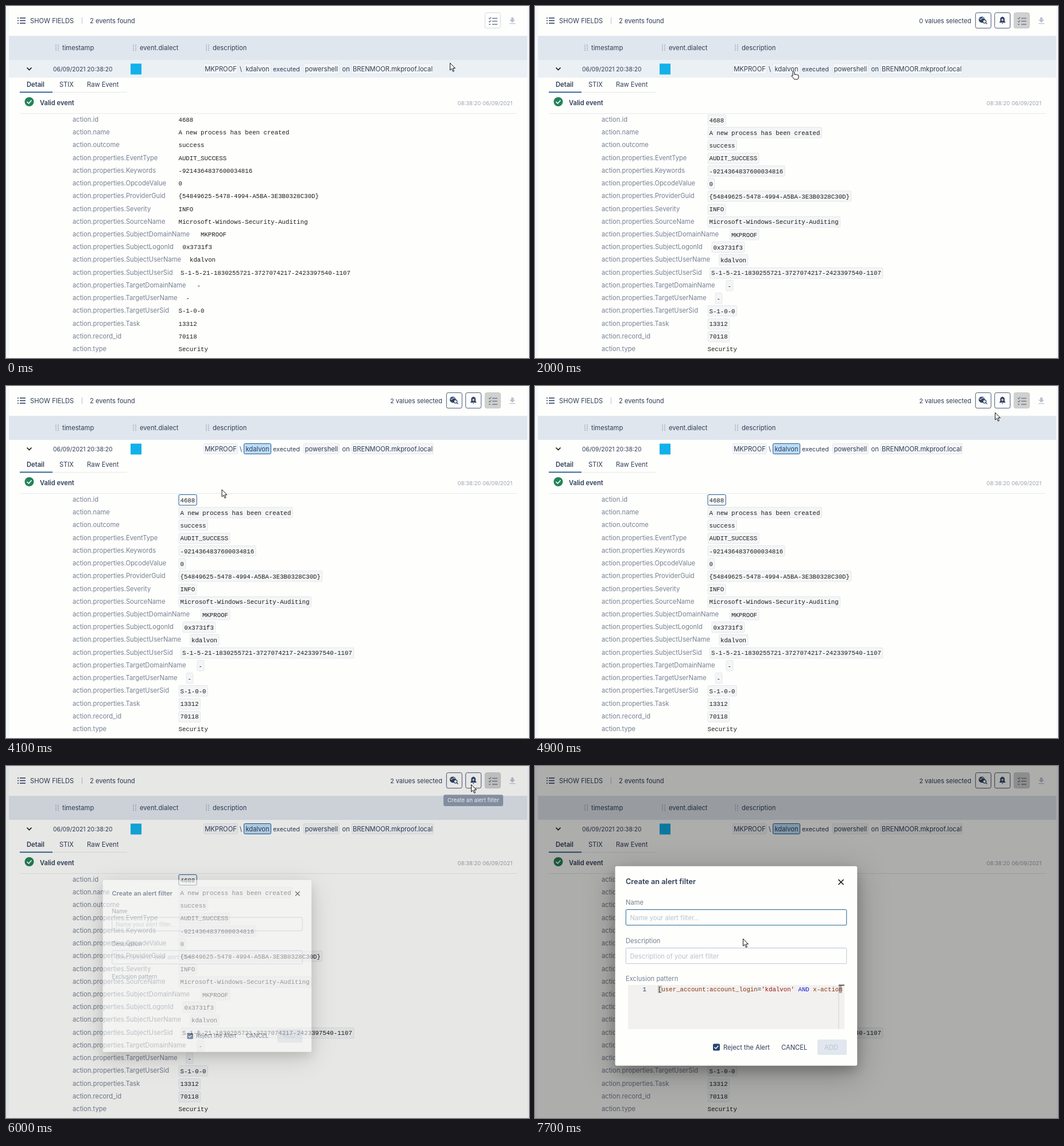
An HTML page that plays this animation: 911 px wide and 614 px high, repeating every 8 s.

```html
<!DOCTYPE html>
<html lang="en">
<head>
<meta charset="utf-8">
<title>Alert filter from an event</title>
<style>
  html, body { margin: 0; width: 100%; height: 100%; overflow: hidden; background: #f5f8fc; }
  svg { display: block; width: 911px; height: 614px; }
  text { font: 11.2px Inter, sans-serif; fill: #2f3e59; white-space: pre; }
  .bold { font-weight: 600; }
  .label { fill: #758093; }
  .hint { fill: #b9c2d0; }
  .mono { font: 10.72px "Liberation Mono", monospace; fill: #1c1c1c; }
  .date { font-size: 10.3px; }
  .small { font-size: 9.5px; fill: #9ca4b0; }
  .tip { font-size: 9.6px; fill: #fff; }
  .chip { fill: #f4f5f6; stroke: #e4e8ed; }
  .chip.picked { fill: #bcdcf6; stroke: #1d5a92; }
  .chip.outlined { fill: #fefefc; stroke: #1d5a92; }
  .button { fill: #fefefc; stroke: #46567a; }
  .field { fill: #fefefc; stroke: #b9c5d8; }
  .field.focused { stroke: #1f6596; }
  #panel { filter: drop-shadow(0 9px 10px #0003) drop-shadow(0 12px 26px #0004); }
</style>
</head>
<body>
<svg id="stage" viewBox="0 0 911 614"></svg>
<script>
const USER = 'kdalvon', DOMAIN = 'MKPROOF', HOST = 'BRENMOOR.mkproof.local';
const LOOP = 8000, STEP = 100, ROW = 22.22, CHAR = 6.433;

// label, value, optional value position
const fields = [
  ['id', '4688'],
  ['name', 'A new process has been created'],
  ['outcome', 'success'],
  ['properties.EventType', 'AUDIT_SUCCESS'],
  ['properties.Keywords', '-9214364837600034816'],
  ['properties.OpcodeValue', '0'],
  ['properties.ProviderGuid', '{54849625-5478-4994-A5BA-3E3B0328C30D}'],
  ['properties.Severity', 'INFO'],
  ['properties.SourceName', 'Microsoft-Windows-Security-Auditing'],
  ['properties.SubjectDomainName', DOMAIN, 339],
  ['properties.SubjectLogonId', '0x3731f3', 307.5],
  ['properties.SubjectUserName', USER, 320],
  ['properties.SubjectUserSid', 'S-1-5-21-1830255721-3727074217-2423397540-1107', 304],
  ['properties.TargetDomainName', '-', 332.5],
  ['properties.TargetUserName', '-', 313.5],
  ['properties.TargetUserSid', 'S-1-0-0'],
  ['properties.Task', '13312'],
  ['record_id', '70118'],
  ['type', 'Security'],
];

const text = (x, y, content, cls = '', extra = '') =>
  `<text x="${x}" y="${y}" class="${cls}" ${extra}>${content}</text>`;
const rect = (x, y, w, h, attrs = '') =>
  `<rect x="${x}" y="${y}" width="${w}" height="${h}" ${attrs}/>`;
const path = (d, attrs) => `<path d="${d}" ${attrs}/>`;
const stroke = (d, color, width = 1.5) =>
  path(d, `fill="none" stroke="${color}" stroke-width="${width}"`);
const group = (id, content) => `<g id="${id}">${content}</g>`;

const listIcon = (x, y, color) =>
  stroke([0, 4.5, 9].map(d => `M${x} ${y + d}h2M${x + 4} ${y + d}h10`).join(''), color);
const checkList = stroke('M841 21l1.5 1.5 2.5-3M841 26.5l1.5 1.5 2.5-3M841 32h3M847 21.5h9M847 26.5h9M847 32h9',
  '#6d7a91', 1.3);
const grip = x => [0, 3, 6, 9].map(d =>
  rect(x, 67.5 + d, 2, 1.6, 'fill="#aab4c1"') + rect(x + 4, 67.5 + d, 2, 1.6, 'fill="#aab4c1"')).join('');
const column = (x, name) => grip(x - 12) + text(x, 77, name);
const chip = (x, w, label, id = '') =>
  rect(x + .5, 100.5, w - 1, 18, `rx="2" class="chip" id="${id}"`) +
  text(x + w / 2, 113.5, label, '', 'text-anchor="middle"');
const tooltip = (id, x, w, label) => group(id,
  rect(x, 50, w, 20, 'rx="3" fill="#52617a"') + text(x + w / 2, 63.3, label, 'tip', 'text-anchor="middle"'));

const toolbar =
  listIcon(20, 21, '#24375a') + text(42, 29.5, 'SHOW FIELDS') +
  stroke('M132.5 20v11', '#b9c1cc', 1) + text(146, 29.5, '2 events found') +
  group('selection',
    text(760, 29.5, '', '', 'id="count" text-anchor="end" style="font-size:11px"') +
    rect(767.3, 11.7, 27, 27, 'rx="3" class="button"') +
    '<circle cx="778.3" cy="23.8" r="5.4" fill="#2f4368"/>' +
    stroke('M774 22.500l3 1 2-3 3.500 1', '#fefefc', 1) +
    '<circle cx="783" cy="27" r="2.8" fill="#fefefc" stroke="#2f4368" stroke-width="1.2"/>' +
    stroke('M785 29l2.5 2.5', '#2f4368', 1.3) +
    rect(800.7, 11.7, 27, 27, 'rx="3" class="button"') +
    path('M809 29v-1l1.300-1.300v-3.700Q810.300 20 813 19.200q1.200-1.500 2.400 0Q818.100 20 818.100 23v3.700l1.300 1.300v1zM812.800 30h2.800q-1.400 2.600-2.800 0', 'fill="#2f4368"') +
    stroke('M814.2 22v4.4M812 24.2h4.4', '#fefefc', 1.1)) +
  rect(834.3, 11.7, 27, 27, 'rx="3" id="toggle"') + checkList +
  path('M880 20h4v4h3l-5 5-5-5h3zM877 30h10v1.3h-10z', 'fill="#b9c1cf"');

const eventRow =
  rect(5, 94, 903, 31, 'id="row"') +
  stroke('M36.5 107.5l4 4 4-4', '#1c1c1c', 1.7) +
  text(82, 113.5, '06/09/2021 20:38:20', 'date') +
  rect(217, 100.5, 19, 19, 'fill="#12b1ea"') +
  chip(344, 60, DOMAIN) + text(407, 113.5, '\\') + chip(414, 48, USER, 'userChip') +
  text(465, 113.5, 'executed', '', 'style="font-size:10.8px"') + chip(518, 63, 'powershell') +
  text(585.5, 113.5, 'on') + chip(602, 143, HOST);

const tabs =
  text(36, 141, 'Detail', 'bold') + text(93, 141, 'STIX') + text(141, 141, 'Raw Event') +
  rect(24, 150.3, 187, .8, 'fill="#dfe3e9"') + rect(24, 149.5, 57, 1.7, 'fill="#1c528c"') +
  '<circle cx="40.5" cy="167" r="8" fill="#22835a"/>' +
  stroke('M36.5 167l3 3 5-5.5', '#fff', 1.7) +
  text(59, 172.5, 'Valid event', 'bold') +
  text(882, 172.5, '08:38:20 06/09/2021', 'small', 'text-anchor="end"') +
  rect(24, 187, 866, 1, 'fill="#e6e9ed"');

const details = fields.map(([label, value, x = 300.5], i) => {
  const y = 198 + i * ROW, selectable = i < fields.length - 1;
  return text(116, y + 4, 'action.' + label, 'label') +
    (selectable ? rect(x + .5, Math.round(y) - 8.5, value.length * CHAR + 5.5, 18.5,
      `rx="2" class="chip valueChip" id="value${i}"`) : '') +
    text(x, y + 4, value, selectable ? 'mono value' : 'mono');
}).join('');

const colored = (color, s) => `<tspan fill="${color}">${s}</tspan>`;
const code = '[' + colored('#8a3412', 'user_account:account_login') + '=' +
  colored('#9c1a15', `'${USER}'`) + ' ' + colored('#1c1cdc', 'AND') + ' ' + colored('#8a3412', 'x-action');
const editor =
  rect(162, 382, 377, 77, 'fill="#f2f1ef"') +
  rect(214.5, 383.5, 6, 12, 'fill="#dcdcd8" stroke="#b9b9b5"') +
  rect(528.5, 382, 1, 77, 'fill="#d2d2d0"') + rect(529.5, 383, 5, 13, 'fill="#a9a9a7"') +
  rect(529, 381.5, 10, 1.7, 'fill="#454545"') +
  text(187.5, 393, '1', 'mono', 'style="fill:#24425f"') + text(214, 392.5, code, 'mono');
const input = (y, hint, id = '') =>
  rect(158.3, y + .5, 384.4, 27.2, `rx="2" class="field" id="${id}"`) + text(165.5, y + 18.5, hint, 'hint');
const dialog =
  rect(139.6, 174.8, 421.6, 348, 'rx="3" fill="#fefefc" id="panel"') +
  text(158, 206.3, 'Create an alert filter', 'bold', 'style="font-size:12.7px"') +
  stroke('M528.5 198l9 9M537.5 198l-9 9', '#1c1c1c', 1.7) +
  text(158, 242, 'Name', 'label') + input(250, 'Name your alert filter...', 'nameField') +
  rect(166, 257, 1, 14, 'id="caret" fill="#222"') +
  text(158, 308.5, 'Description', 'label') + input(317, 'Description of your alert filter') +
  text(158, 375, 'Exclusion pattern', 'label') + group('editor', editor) +
  rect(310, 484.5, 12, 12, 'rx="2" fill="#274472"') +
  stroke('M312.5 490.5l2.5 2.5 4.5-5', '#fff') +
  text(328, 494.5, 'Reject the Alert') + text(429, 494.5, 'CANCEL') +
  rect(492, 477, 51, 27, 'rx="2" fill="#e1e7ee"') + text(504, 494.5, 'ADD', 'hint');

const pointer = 'fill="#fff" stroke="#111" stroke-linejoin="round"';
stage.innerHTML =
  rect(5, 0, 903, 614, 'fill="#fefefc"') + toolbar +
  rect(5, 52, 903, 42, 'fill="#e0e6ed"') +
  column(98, 'timestamp') + column(233, 'event.dialect') + column(360, 'description') +
  eventRow + tabs + details +
  rect(0, 0, 911, 614, 'id="backdrop"') +
  tooltip('toggleTip', 777, 114, 'Toggle value selection') +
  tooltip('alertTip', 762, 104, 'Create an alert filter') +
  group('dialog', dialog) +
  group('cursor',
    path('M.5 .5V13l3-2.7 2 5 2-.9-2-4.8h4z', `id="arrow" ${pointer}`) +
    path('M1 1.2Q2.4-.6 3.8 1.2V5.5Q5 4.6 6 5.8 7.4 5 8.4 6.2 10 5.6 11 7V10Q11 12 9.6 14H3.8Q2 11-1.4 8.2-.6 6.6 1 8Z',
      `id="hand" ${pointer}`));

const $ = id => document.getElementById(id);
const show = (id, opacity) => $(id).setAttribute('opacity', +opacity);

// Eased interpolation through [time, ...values] keys
function track(t, keys) {
  const next = keys.findIndex(k => k[0] > t);
  if (next < 0) return keys.at(-1).slice(1);
  if (next === 0) return keys[0].slice(1);
  const a = keys[next - 1], b = keys[next], u = (t - a[0]) / (b[0] - a[0]);
  const s = u * u * (3 - 2 * u);
  return a.slice(1).map((v, i) => v + (b[i + 1] - v) * s);
}

const cursorPath = [
  [300, 773, 99], [900, 845, 29], [1200, 845, 29], [2000, 448, 114], [2300, 437, 108], [2500, 437, 108],
  [2700, 433, 131], [2900, 432, 125], [3500, 319, 203], [3700, 316, 198], [3900, 316, 198],
  [4800, 788, 57], [4900, 801, 46], [5200, 810, 32], [6100, 810, 32], [6700, 470, 262],
  [7000, 400, 262], [7200, 400, 262], [7500, 362, 301],
];

function render(t) {
  const [x, y] = track(t, cursorPath);
  const selecting = t >= 1200, userPicked = t >= 2400, idPicked = t >= 3700, modal = t >= 5900;
  const inside = (left, top, right, bottom) => x >= left && x <= right && y >= top && y <= bottom;

  const overControl = inside(834, 11, 862, 39) || selecting &&
    (inside(800, 11, 828, 39) || inside(414, 100, 462, 119) || inside(301, 190, 332, 208));
  const pointing = !modal && overControl;
  $('cursor').setAttribute('transform', `translate(${x} ${y})`);
  show('hand', pointing);
  show('arrow', !pointing);

  $('row').setAttribute('fill', !modal && y > 94 && y < 124 ? '#ebf0f5' : '#fefefc');
  show('selection', selecting);
  $('count').textContent = `${userPicked + idPicked} values selected`;
  $('toggle').setAttribute('fill', selecting ? '#d0d0cf' : '#fefefc');
  $('toggle').setAttribute('stroke', selecting ? '#c6c7c9' : '#d3d8df');
  document.querySelectorAll('.valueChip').forEach(el => el.setAttribute('opacity', +selecting));
  document.querySelectorAll('.value').forEach(el =>
    el.setAttribute('transform', selecting ? 'translate(3 .7)' : ''));
  $('userChip').classList.toggle('picked', userPicked);
  $('value0').classList.toggle('outlined', idPicked);

  show('toggleTip', track(t, [[700, 0], [900, 1], [1200, 1], [1400, 0]])[0]);
  show('alertTip', track(t, [[5000, 0], [5200, 1], [5900, 1], [6000, .6], [6100, 0]])[0]);

  const [open, shade, editorOpacity] = track(t,
    [[5900, 0, 0, 0], [6000, .54, .09, 0], [6100, .993, .26, .15], [6200, 1, .32, .75], [6300, 1, .32, 1]]);
  show('backdrop', shade);
  show('dialog', open);
  $('dialog').setAttribute('transform',
    `translate(350.5 349) scale(${.7 + .3 * open}) translate(-350.5 -349)`);
  show('editor', editorOpacity);
  $('nameField').classList.toggle('focused', t >= 7200);
  show('caret', t >= 7200 && t < 7700);
}

function frame(now) {
  render(Math.floor(now % LOOP / STEP) * STEP);
  requestAnimationFrame(frame);
}
requestAnimationFrame(frame);
</script>
</body>
</html>
```
